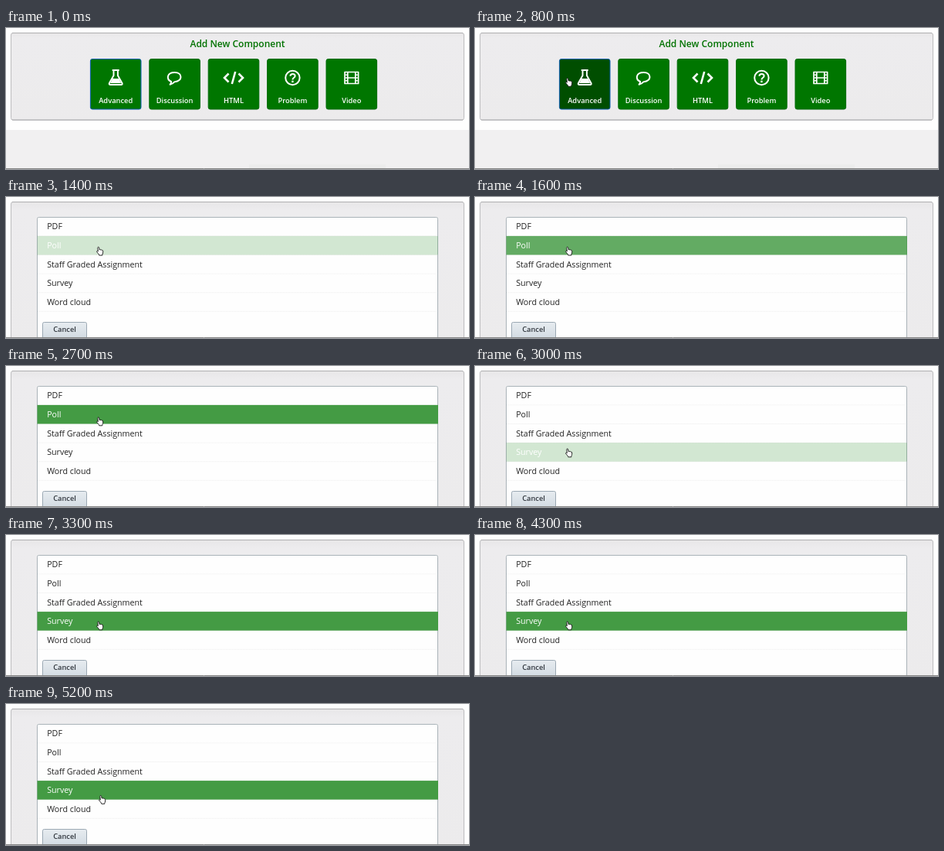
An HTML page that plays this animation: 600 px wide and 184 px high, repeating every 5300 ms.

```html
<!DOCTYPE html>
<html lang="en">
<head>
<meta charset="utf-8">
<title>Add New Component</title>
<style>
  html, body { margin: 0; width: 100%; height: 100%; overflow: hidden; background: #fefefe; }
  svg { display: block; width: 600px; height: 184px; }
  text { font-family: "Open Sans", sans-serif; }
  .title { font-size: 12px; font-weight: 600; fill: #007200; text-anchor: middle; }
  .label { font-size: 9.3px; font-weight: 600; fill: #fff; text-anchor: middle; }
  .item { font-size: 10.7px; fill: #222; }
  .cancel { font-size: 9.3px; font-weight: 600; fill: #30353c; text-anchor: middle; }
  .icon { fill: none; stroke: #fff; stroke-width: 2; stroke-linejoin: round; }
</style>
</head>
<body>
<svg viewBox="0 0 600 184">
  <defs>
    <linearGradient id="panelFill" x2="0" y2="1">
      <stop offset="0" stop-color="#e8e7e8"/>
      <stop offset=".06" stop-color="#edecee"/>
      <stop offset="1" stop-color="#ecebec"/>
    </linearGradient>
    <linearGradient id="cancelFill" x2="0" y2="1">
      <stop offset="0" stop-color="#e7ecf0"/>
      <stop offset="1" stop-color="#d0d9e1"/>
    </linearGradient>
  </defs>

  <g id="picker">
    <rect y="133" width="600" height="51" fill="#f1f0f1"/>
    <rect x="315" y="178" width="177" height="5" fill="#ececec"/>
    <rect x="6.5" y="6.5" width="587" height="113.5" rx="2.5" fill="url(#panelFill)" stroke="#bcbcbe"/>
    <path d="M8 6.5H592M8 120H592" stroke="#aeaeb0"/>
    <text class="title" x="300" y="25.4">Add New Component</text>
    <g id="tiles"></g>
  </g>

  <g id="menu">
    <rect x="6.5" y="6.5" width="587" height="190" rx="2.5" fill="url(#panelFill)" stroke="#bcbcbe"/>
    <path d="M8 6.5H592" stroke="#aeaeb0"/>
    <rect x="40.5" y="26.5" width="519" height="170" rx="2" fill="#fefefe" stroke="#a9b2b8"/>
    <g id="rows"></g>
    <rect x="47.5" y="163.5" width="57" height="24" rx="2" fill="url(#cancelFill)" stroke="#9ba8b3"/>
    <text class="cancel" x="76" y="176.2">Cancel</text>
  </g>

  <path d="M0 183.5H600" stroke="#858585"/>
  <path id="hand" fill="#fff" stroke="#111" stroke-width=".9" stroke-linejoin="round"
    d="M2.3 6.2L1.8 1.6Q1.8.5 2.7.5Q3.5.5 3.7 1.5L4.1 4Q5.1 3.3 5.7 4.2Q6.7 3.6 7.2 4.6Q8.4 4.3 8.7 5.5L8.6 8Q8.4 9.4 7.8 10.2V11.3H3.8Q3.5 10 2.3 8.7L.7 6.9Q.3 5.7 1.4 5.6Z"/>
</svg>

<script>
  const LOOP = 5300, STEP = 100, ROW = 24.6;
  const $ = id => document.getElementById(id);

  // Icons are drawn around the point (0, 0).
  const tiles = [
    ['Advanced', `<path class="icon" d="M-4.5 -10H4.5M-2.7 -10V-3L-8.3 7Q-9 9 -7 9H7Q9 9 8.3 7L2.7 -3V-10"/>
      <path d="M-4 1H4L7 7H-7Z" fill="#fff"/>`],
    ['Discussion', `<path class="icon" d="M-4.5 5C-11 2 -10.5 -7 0 -7S10.5 4.7 0 5.2Q-2.5 8 -6 8.7Q-4.3 7 -4.5 5Z"/>`],
    ['HTML', `<path class="icon" style="stroke-width:2.6;stroke-linejoin:miter" d="M-6.5 -5.5L-12 0L-6.5 5.5M6.5 -5.5L12 0L6.5 5.5M2.2 -8L-2.2 8"/>`],
    ['Problem', `<circle class="icon" r="9.2"/>
      <path class="icon" d="M-3 -2.3C-2.8 -6 3.3 -6 3.2 -2.3C3.2 -.2 0 -.2 0 2.4"/>
      <rect x="-1.2" y="3.7" width="2.4" height="2.4" fill="#fff"/>`],
    ['Video', `<path class="icon" style="stroke-width:1.7" d="M-8.8 -7.5H8.8V7.5H-8.8ZM-5 -7.5V7.5M5 -7.5V7.5M-5 0H5"/>
      <path class="icon" style="stroke-width:1.5" d="M-8 -3.7H-5M-8 0H-5M-8 3.7H-5M5 -3.7H8M5 0H8M5 3.7H8"/>`]
  ];
  $('tiles').innerHTML = tiles.map(([name, icon], i) => `
    <g transform="translate(${142.2 + i * 76.4} 65)">
      <rect x="-32.8" y="-24.5" width="65.6" height="65.5" rx="2.5"
        fill="#007600" stroke="${i ? '#006a08' : '#0b5cb0'}"/>
      ${icon}
      <text class="label" y="33.2">${name}</text>
    </g>`).join('');

  const items = ['PDF', 'Poll', 'Staff Graded Assignment', 'Survey', 'Word cloud'];
  $('rows').innerHTML = items.map((name, i) => {
    const y = 26.3 + i * ROW;
    return `<path d="M41 ${y + ROW}H559" stroke="#e6e6e6" stroke-width=".7" stroke-dasharray="1 1"/>
      <rect class="glow" x="40.5" y="${y}" width="519.5" height="${ROW}" fill="#449b44" opacity="0"/>
      <text class="item" x="53.2" y="${y + 16.1}">${name}</text>`;
  }).join('');

  const advanced = $('tiles').querySelector('rect');
  const glows = document.querySelectorAll('.glow');
  const labels = document.querySelectorAll('.item');

  // Linear interpolation through [time, value] keys.
  function track(t, keys) {
    const i = keys.findIndex(k => k[0] > t);
    if (i < 0) return keys[keys.length - 1][1];
    if (i === 0) return keys[0][1];
    const [t0, a] = keys[i - 1], [t1, b] = keys[i];
    return a + (b - a) * (t - t0) / (t1 - t0);
  }

  const handX = [[100, 123], [500, 117], [4500, 117], [5000, 121], [5200, 120]];
  const handY = [[100, 94], [500, 65], [1900, 64.7], [2500, 66.5], [2700, 66.5],
    [2900, 97], [3000, 107.5], [3300, 112.5], [4500, 112.5], [5000, 118.5], [5200, 119]];
  const hover = [[100, 0], [500, 1]];
  const glow = {
    1: [[1300, 0], [1400, .23], [1500, .57], [1600, .83], [1700, 1], [2700, 1], [2800, .75], [2900, .2], [3000, 0]],
    2: [[2800, 0], [2900, .12], [3000, 0]],
    3: [[2900, 0], [3000, .23], [3100, .57], [3200, .83], [3300, 1]]
  };

  function draw(now) {
    const t = Math.floor(now % LOOP / STEP) * STEP;
    const open = t >= 1300;
    $('picker').style.display = open ? 'none' : '';
    $('menu').style.display = open ? '' : 'none';

    const h = track(t, hover);
    advanced.setAttribute('fill', `rgb(0 ${118 - 40 * h} 0)`);

    for (const i in glow) {
      const a = track(t, glow[i]);
      glows[i].setAttribute('opacity', a);
      labels[i].style.fill = a > .1 ? '#fff' : '';
    }

    $('hand').style.display = t < 100 ? 'none' : '';
    $('hand').setAttribute('transform', `translate(${track(t, handX)} ${track(t, handY)})`);
  }

  function tick() {
    draw(performance.now());
    requestAnimationFrame(tick);
  }
  draw(0);
  requestAnimationFrame(tick);
</script>
</body>
</html>
```
